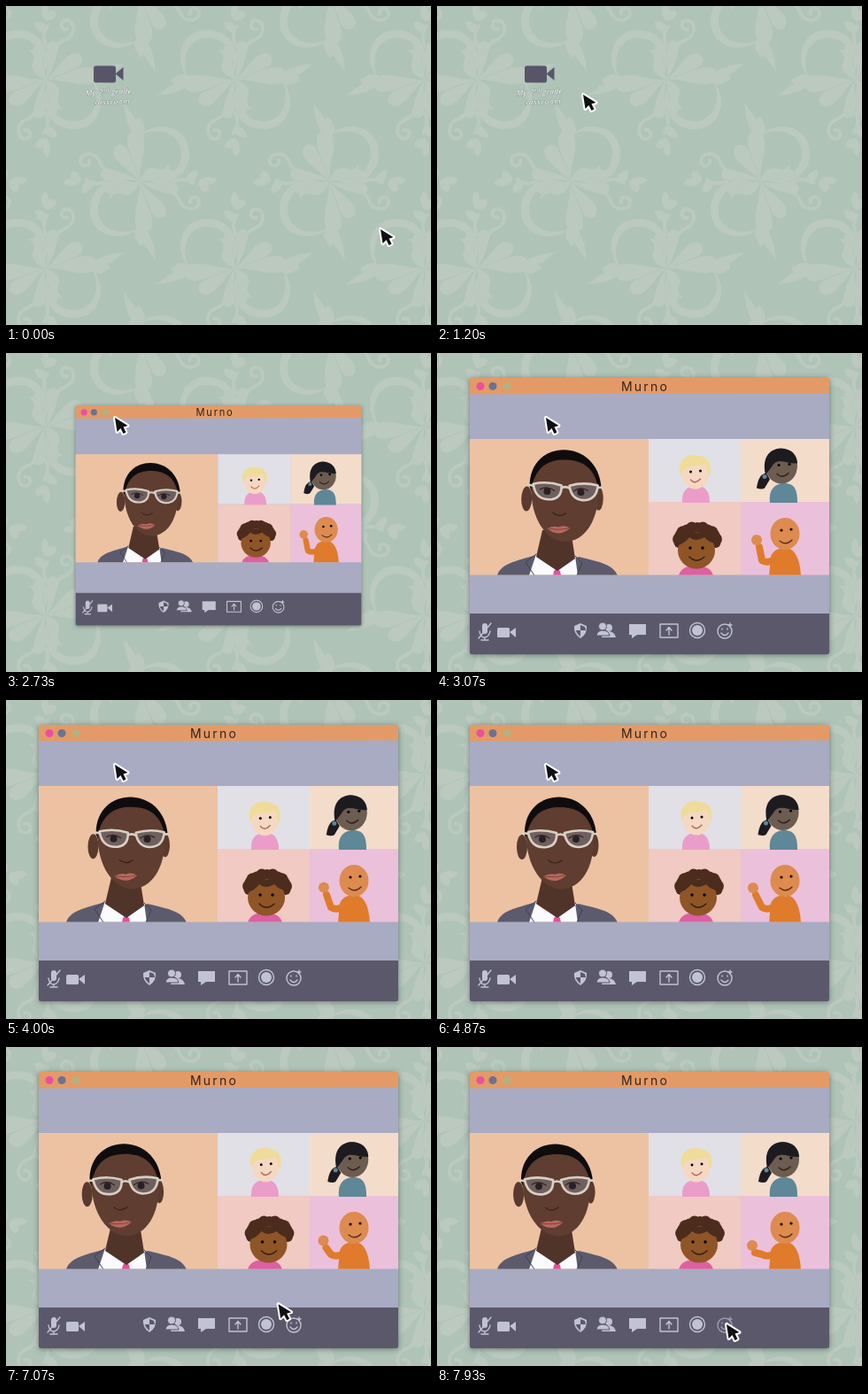
Animation of 480 by 360 pixels, one loop 8 s. Source, as an HTML page:

```html
<!DOCTYPE html>
<html lang="en">
<head>
<meta charset="utf-8">
<title>Joining the classroom call</title>
<style>
  html, body { margin: 0; width: 100%; height: 100%; overflow: hidden; background: #afc3b7; }
  svg { display: block; width: 100vw; height: 100vh; }
  .label { font: italic 8.6px "Open Sans", sans-serif; text-anchor: middle;
    paint-order: stroke; stroke: #8a9a91; stroke-width: 1px; fill: #fff; }
  .title { font: 14px Inter, sans-serif; letter-spacing: 2.2px; text-anchor: middle; fill: #33231c; }
  .line { fill: none; stroke-linecap: round; stroke-linejoin: round; }
  #icon { fill: #58556a; }
  #icon.active { fill: #e799c2; stroke: #8d5573; stroke-width: .8px; }
  #icon.active .label { fill: #c4648f; stroke: #9fafa5; }
</style>
</head>
<body>
<svg viewBox="0 0 480 360" preserveAspectRatio="none">
  <defs>
    <g id="half" fill="#bbc9bf">
      <path d="M2-53C16-69 56-65 56-32C56-4 30 8 6-2C26 0 47-10 47-32C47-55 20-62 2-53Z"/>
      <path d="M0 0C4-14 14-18 20-14C28-12 31-16 33-20C36-10 28-2 0 0Z"/>
      <path d="M0 0C-4-20-16-36-14-50C-11-61 3-58 5-48C7-34 0-20 0 0Z"/>
      <path d="M0 0C-12-14-30-22-30-34C-28-45-16-43-13-34C-9-24-4-14 0 0Z"/>
      <path d="M0 0C-18-4-32 2-40-2C-48-8-42-17-34-14C-22-11-10-8 0 0Z"/>
      <path d="M0 0C-14 8-30 18-38 12C-42 5-36 1-28 3C-18 5-10 3 0 0Z"/>
      <path d="M0-46C-12-56-17-70-18-90C-13-80-8-78-5-70C-1-74 1-73 2-69C8-62 7-54 0-46Z"/>
      <path d="M-66 0c0-8-5-12-9-12c-4 3-3 7-2 9c-4-1-8 1-10 5c6 4 14 5 21-2z"/>
      <path d="M-58-2c-5 2-9 9-7 15c7 0 13-6 13-13z"/>
      <path class="line" stroke="#bbc9bf" stroke-width="4" d="M-30-8C-40-12-44-18-46-24C-52-35-68-32-67-22C-65-15-55-17-57-24M-38 0C-48 4-54 2-60-2"/>
    </g>
    <g id="motif"><use href="#half"/><use href="#half" transform="rotate(180)"/></g>
    <filter id="shadow" x="-10%" y="-10%" width="120%" height="120%">
      <feDropShadow dx="0" dy="1" stdDeviation="3" flood-color="#3c4c48" flood-opacity=".65"/>
    </filter>
    <clipPath id="stage"><rect x="37" y="97" width="406" height="153.500"/></clipPath>
  </defs>

  <rect width="480" height="360" fill="#afc3b7"/>
  <g id="wallpaper"></g>

  <g id="icon">
    <rect x="99" y="67.500" width="25" height="19" rx="2.500"/>
    <path d="M123.500 76.500L132.500 69V84Z"/>
    <g transform="rotate(-2 116 100)">
      <text class="label" x="116" y="100" letter-spacing=".25">My 2<tspan dy="-3" font-size="6">nd</tspan><tspan dy="3"> grade</tspan></text>
      <text class="label" x="118" y="111" style="font-size:8px" letter-spacing=".9">classroom</text>
    </g>
  </g>

  <g id="win">
    <g filter="url(#shadow)"><rect x="37" y="28" width="406" height="312" rx="2" fill="#a8abc2"/></g>
    <path d="M37 30q0-2 2-2H441q2 0 2 2V45.500L37 46.500Z" fill="#e49a66"/>
    <circle cx="49" cy="37.500" r="4.500" fill="#e9509f"/>
    <circle cx="63" cy="37.500" r="4.500" fill="#6a7391"/>
    <circle cx="79" cy="37.500" r="4.500" fill="#b3b27d"/>
    <text class="title" x="235" y="43">Murno</text>

    <rect x="37" y="97" width="202" height="153.500" fill="#edc2a2"/>
    <rect x="239" y="97" width="104" height="71" fill="#e1e0e7"/>
    <rect x="343" y="97" width="100" height="71" fill="#f3ddca"/>
    <rect x="239" y="168" width="104" height="82.500" fill="#f0cac3"/>
    <rect x="343" y="168" width="100" height="82.500" fill="#ebc0da"/>

    <g clip-path="url(#stage)">
      <path d="M68 251C72 238 88 235 112 228L136 240L160 230C184 236 198 238 204 251Z" fill="#5b5b6d"/>
      <path d="M112 227L104 251H159L156 229L136 240Z" fill="#fbfafc"/>
      <path d="M112 227L100 236L110 251M156 229L164 237L158 251" class="line" stroke="#3f4053"/>
      <path d="M132 246L135 243L139 246L140 251H131Z" fill="#e4519b"/>
      <path d="M119 200H151L156 232L136 246L112 230Z" fill="#50342a"/>
      <g id="man">
        <path d="M99 152C97 97 175 94 180 152L176 160H102Z" fill="#0f0c0e"/>
        <ellipse cx="96" cy="166" rx="6" ry="14" fill="#5a392e"/>
        <ellipse cx="177.500" cy="164" rx="5" ry="13" fill="#5a392e"/>
        <path d="M101 154C106 128 121 121 139 121C158 121 172 129 177 153C178 185 166 209 145 213C122 217 101 190 101 154Z" fill="#5f3d31"/>
        <g class="line" stroke="#d9cfc0" stroke-width="2.600">
          <path d="M103 149Q119 145 135 150Q136 164 124 166Q106 168 103 149ZM144 150Q160 145 176 149Q175 166 159 166Q146 165 144 150ZM135 153Q139 150 144 153M103 151L97 150M176 151L181 151" fill="#77737a" fill-opacity=".65"/>
        </g>
        <circle cx="119" cy="157" r="4" fill="#282026"/>
        <circle cx="157" cy="157" r="4" fill="#282026"/>
        <path class="line" stroke="#352119" stroke-width="1.200" d="M111 155Q119 150 127 156M149 156Q157 150 165 155M126 181Q133 187 141 181"/>
        <path d="M120 199Q128 195 133 197Q139 194 146 198Q139 204 133 204Q126 204 120 199Z" fill="#b9675f"/>
        <path class="line" stroke="#7e443e" d="M121 199Q133 201 145 198"/>
      </g>

      <path d="M277 169C276 155 283 150 293 150C304 150 308 157 308 169Z" fill="#ea9dc8"/>
      <g id="blonde">
        <ellipse cx="293" cy="135" rx="15.500" ry="17.500" fill="#f5d8c2"/>
        <path d="M276 134C272 116 290 112 298 115C309 117 313 126 309 138C306 132 307 126 303 124C293 129 281 123 277 136Z" fill="#efdc98"/>
        <path class="line" stroke="#b3625c" stroke-width="1.300" d="M288 142Q293 148 299 141"/>
        <circle cx="288" cy="133" r="1.500"/><circle cx="299" cy="132" r="1.500"/>
      </g>

      <path d="M376 169C374 153 383 147 392 147C405 147 407 156 407 169Z" fill="#5e8798"/>
      <g id="pigtail">
        <path d="M374 135Q365 136 363 152Q369 154 372 152L378 142Z" fill="#1c1b20"/>
        <ellipse cx="391" cy="127" rx="18" ry="20" fill="#6d5c50"/>
        <path d="M373 137C367 109 387 105 396 108C405 110 409 117 409 124C397 125 386 116 380 128Z" fill="#1c1b20"/>
        <circle cx="372" cy="139" r="2.500" fill="#5e8798"/>
        <path class="line" stroke="#2b1f1c" stroke-width="1.300" d="M386 136Q392 142 399 135"/>
        <circle cx="388" cy="126" r="1.600"/><circle cx="400" cy="125" r="1.600"/>
      </g>

      <path d="M273 251Q276 240 292 240Q309 240 312 251Z" fill="#dc60a2"/>
      <g id="curly">
        <g id="curls" fill="#4b2c1d"></g>
        <ellipse cx="293" cy="223" rx="21" ry="20.500" fill="#8f5527"/>
        <path d="M270 218Q274 201 293 203Q313 201 318 216Q307 214 302 208Q292 214 285 208Q280 215 270 218Z" fill="#4b2c1d"/>
        <path class="line" stroke="#341b10" stroke-width="1.500" d="M285 230Q293 238 302 230"/>
        <circle cx="286" cy="220" r="1.700"/><circle cx="300" cy="220" r="1.700"/>
      </g>

      <path d="M375 251L377 230Q380 220 394 220Q409 221 411 251Z" fill="#df7b2b"/>
      <path id="arm" class="line" stroke="#df7b2b" stroke-width="8"/>
      <circle id="hand" r="6" fill="#dd8b4f"/>
      <ellipse cx="393" cy="204" rx="16.500" ry="18" fill="#dd8b4f"/>
      <path class="line" stroke="#55301c" stroke-width="1.300" d="M387 212Q394 218 401 211"/>
      <circle cx="389" cy="200" r="1.600"/><circle cx="400" cy="199" r="1.600"/>
    </g>

    <path d="M37 294H443V338q0 2-2 2H39q-2 0-2-2Z" fill="#5b586b"/>
    <g fill="#c1c2d4">
      <rect x="51" y="305" width="6" height="12" rx="3"/>
      <rect x="68" y="310" width="14" height="11" rx="1.500"/><path d="M82 315L89 310V321Z"/>
      <path d="M162 305L169 308Q170 317 162 322Q154 317 155 308Z"/>
      <path d="M162 307V313H168Q167 309 167 309ZM162 313V320Q157 316 157 313Z" fill="#5b586b"/>
      <circle cx="194" cy="310" r="4"/><path d="M186 321Q187 314 194 314Q201 315 202 321Z"/>
      <circle cx="187" cy="308.500" r="4.500" stroke="#5b586b"/><path d="M180 319Q181 313 187 313Q194 313 195 319Z" stroke="#5b586b"/>
      <path d="M217 306H236V318H226L220 322V318H217Z"/>
      <circle cx="294" cy="313" r="6"/>
    </g>
    <g class="line" stroke="#c1c2d4" stroke-width="1.400">
      <path d="M48 314Q49 321 54 321Q59 320 60 314M54 321V324M50 324H58M61 305L47 322M252 306H272V321H252ZM262 318V310M259 313L262 309.500L265 313"/>
      <circle cx="294" cy="313" r="8.500"/>
      <g id="smiley">
        <circle cx="325" cy="314" r="8"/>
        <path d="M321 316Q325 321 329 316M322 311V312M328 311V312M331 305V309M329 307H333"/>
      </g>
    </g>
  </g>

  <path id="cursor" d="M2 3L4.500 19L8.500 15L11.500 21L14.500 19.500L11.500 13.500L16.500 12Z" fill="#101012" stroke="#fff" stroke-width="4" paint-order="stroke" stroke-linejoin="round"/>
</svg>

<script>
const LOOP = 8000;
const $ = id => document.getElementById(id);
const clamp = v => Math.max(0, Math.min(1, v));
const ease = v => v * v * (3 - 2 * v);
const progress = (t, from, to) => clamp((t - from) / (to - from));
const mix = (a, b, k) => a + (b - a) * k;
const bezier = (a, b, c, d, k) => {
  const j = 1 - k;
  return j * j * j * a + 3 * j * j * k * b + 3 * j * k * k * c + k * k * k * d;
};
const move = (id, x, y, extra = '') => $(id).setAttribute('transform', `translate(${x} ${y}) ${extra}`);

// Eases a value through the shared pose times.
const poseTimes = [3070, 4870, 6200, 7930];
function pose(t, values) {
  let v = values[0];
  for (let i = 1; i < values.length; i++)
    v = mix(v, values[i], ease(progress(t, poseTimes[i - 1], poseTimes[i])));
  return v;
}

// Damask wallpaper: one motif and its quarter turn on a half-drop grid.
let tiles = '';
for (let x = -63; x < 600; x += 214)
  for (let y = -15; y < 460; y += 213)
    tiles += `<use href="#motif" transform="translate(${x} ${y})"/>` +
      `<use href="#motif" transform="translate(${x + 108} ${y + 98}) rotate(90)"/>`;
$('wallpaper').innerHTML = tiles;

let curls = '';
for (let i = 0; i < 13; i++) {
  const a = Math.PI * (0.93 + i * 1.14 / 12);
  curls += `<circle cx="${294 + 21 * Math.cos(a)}" cy="${211 + 14 * Math.sin(a)}" r="${6 + i % 2}"/>`;
}
$('curls').innerHTML = curls;

function cursorAt(t) {
  if (t < 1250) {
    const k = ease(progress(t, 70, 900));
    return [bezier(421, 380, 60, 163, k), bezier(249, 370, 370, 97, k)];
  }
  if (t < 5800) {
    const k = ease(progress(t, 1250, 1600));
    return [mix(163, 121, k), mix(97, 70, k)];
  }
  const k = ease(progress(t, 5800, 7370));
  return [mix(121, 325, k), mix(70, 310, k)];
}

function draw(t) {
  move('cursor', ...cursorAt(t));
  $('icon').classList.toggle('active', t >= 1870);

  const s = progress(t, 2270, 2850);
  $('win').style.display = s > 0 ? '' : 'none';
  $('win').setAttribute('opacity', Math.min(1, 0.7 + 0.45 * s));
  move('win', 240, 181 + 3 * s, `scale(${s}) translate(-240 -184)`);

  move('man', pose(t, [4, 0, -4, -3.5]), pose(t, [-0.5, 0, -0.5, 0]),
    `rotate(${pose(t, [1.5, 0, -1, -0.5])} 136 212)`);
  move('blonde', pose(t, [-1.5, 0, 0.5, 0]), pose(t, [1, 0, -0.5, 0]));
  move('pigtail', pose(t, [-2, -0.5, 0.5, 0]), pose(t, [0.5, 0, 0, 0]));
  move('curly', pose(t, [0, 2, 4, 3]), 0);

  const hx = pose(t, [361, 357, 361, 356]), hy = pose(t, [211, 212, 213, 224]);
  move('hand', hx, hy);
  $('arm').setAttribute('d', `M382 233Q374 238 367 234L${hx + 3} ${hy + 8}`);
  $('smiley').setAttribute('opacity', t > 7300 ? 0.65 : 1);
}

function tick() {
  draw(performance.now() % LOOP);
  requestAnimationFrame(tick);
}
tick();
</script>
</body>
</html>
```
